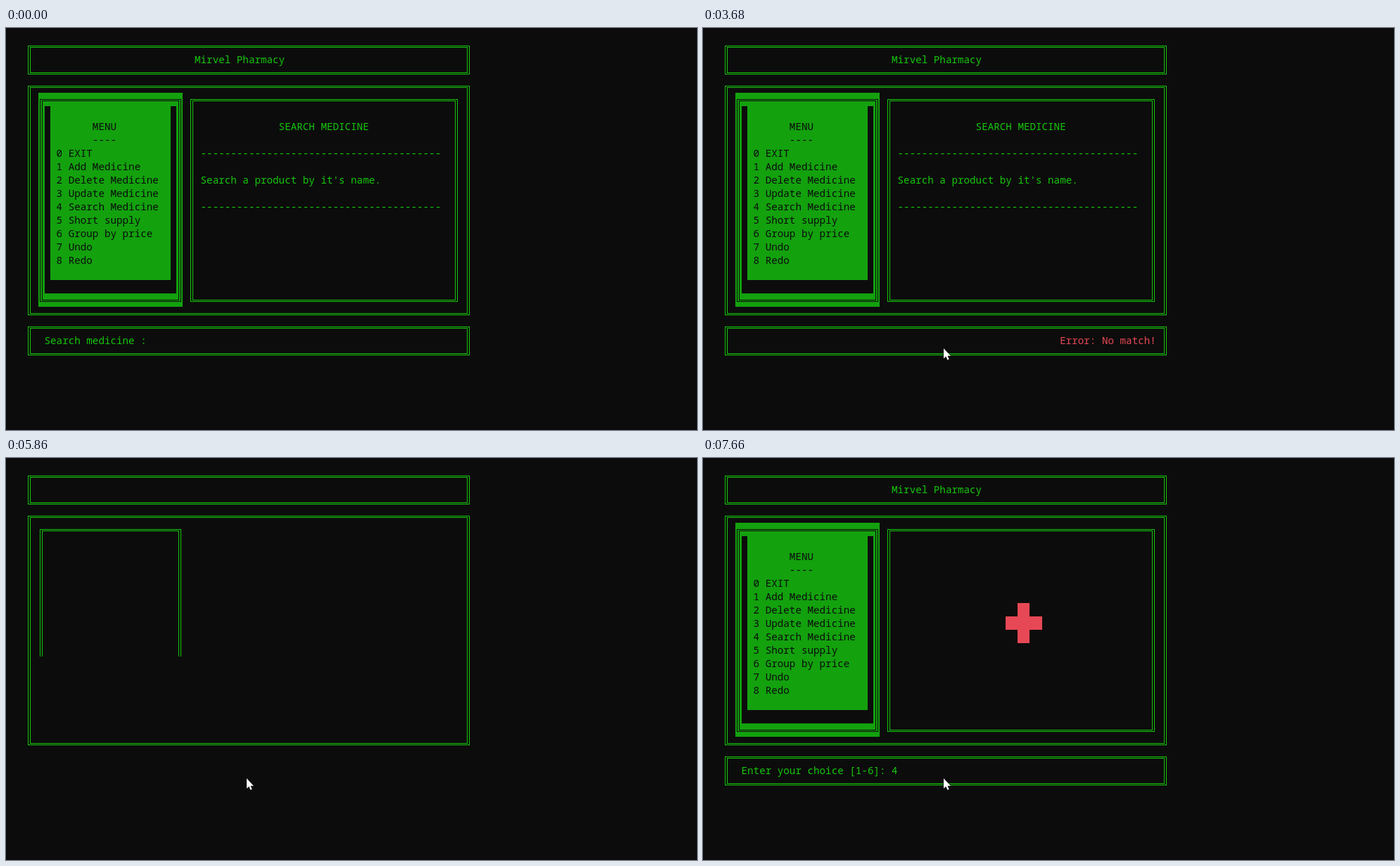
Recreate the animation shown at these times as an HTML page with a canvas. Size 982 by 571 pixels, loop 8000 ms.

```html
<!DOCTYPE html>
<html lang="en">
<head>
<meta charset="utf-8">
<title>Pharmacy console</title>
<style>
  html, body { margin: 0; width: 100%; height: 100%; overflow: hidden; background: #0c0c0c; }
  canvas { display: block; }
</style>
</head>
<body>
<canvas id="stage" width="982" height="571"></canvas>
<script>
const ctx = document.getElementById('stage').getContext('2d');
const LOOP = 8000;
const BG = '#0c0c0c', LIME = '#16c60c', GREEN = '#13a10e', RED = '#e74856', WHITE = '#f2f2f2';
const MENU = ['0 EXIT', '1 Add Medicine', '2 Delete Medicine', '3 Update Medicine',
  '4 Search Medicine', '5 Short supply', '6 Group by price', '7 Undo', '8 Redo'];
const RULE = '-'.repeat(40);

// Console grid: column and row to pixels
const colX = c => 3.3 + 8.54 * c;
const rowY = r => 19 * r - 3;

function cells(col, row, cols, rows, color) {
  ctx.fillStyle = color;
  const x = Math.round(colX(col));
  ctx.fillRect(x, rowY(row), Math.round(colX(col + cols)) - x, rows * 19);
}

function print(text, col, row, color = LIME) {
  ctx.fillStyle = color;
  [...text].forEach((ch, i) => ctx.fillText(ch, colX(col + i), rowY(row) + 15));
}

// Double-line frame through the middle of its border cells
function frame(c1, r1, c2, r2, color = LIME) {
  const x1 = Math.floor(colX(c1) + 2.9), x2 = Math.floor(colX(c2) + 2.9);
  const y1 = rowY(r1) + 9, y2 = rowY(r2) + 9;
  ctx.strokeStyle = color;
  ctx.lineWidth = 1;
  ctx.strokeRect(x1 + 0.5, y1 + 0.5, x2 - x1 + 3, y2 - y1 + 2);
  ctx.strokeRect(x1 + 3.5, y1 + 2.5, x2 - x1 - 3, y2 - y1 - 2);
}

function caret(col) {
  ctx.fillStyle = WHITE;
  ctx.fillRect(Math.round(colX(col)), 448, 9, 5);
}

function menu(count) {
  cells(5, 5, 24, 16, GREEN);
  cells(6, 6, 22, 14, BG);
  cells(7, 6, 20, 13, GREEN);
  frame(5, 5, 28, 20, BG);
  print('MENU', 14, 7, BG);
  print('----', 14, 8, BG);
  MENU.slice(0, count).forEach((item, i) => print(item, 8, 9 + i, BG));
}

function layout(count) {
  frame(3, 1, 76, 3);
  frame(3, 4, 76, 21);
  frame(3, 22, 76, 24);
  frame(30, 5, 74, 20);
  print('Mirvel Pharmacy', 31, 2);
  menu(count);
}

function searchScreen(t) {
  layout(9);
  print('SEARCH MEDICINE', 45, 7);
  print(RULE, 32, 9);
  print("Search a product by it's name.", 32, 11);
  print(RULE, 32, 13);
  if (t < 3150) print('Search medicine :', 6, 23);
  if (t >= 1200 && t < 1680) caret(24);
  if (t >= 1680 && t < 3150) print('4', 24, 23);
  if (t >= 1680 && t < 1830) caret(25);
  if (t >= 3150 && t < 3620) caret(76);
  if ((t >= 2610 && t < 3150) || (t >= 3680 && t < 5640)) print('Error: No match!', 59, 23, RED);
  if (t >= 5700) cells(0, 0, 80, 12, BG);
}

function partialScreen() {
  frame(3, 1, 76, 3);
  frame(3, 4, 76, 21);
  frame(5, 5, 28, 20);
  cells(5, 15, 24, 6, BG);
}

function menuScreen(t) {
  layout(t < 6080 ? 2 : 9);
  if (t < 6130) return;
  cells(52, 11, 2, 3, RED);
  cells(50, 12, 6, 1, RED);
  print('Enter your choice [1-6]:', 6, 23);
  if (t >= 7120 && t < 7580) caret(31);
  if (t >= 7580) print('4', 31, 23);
  if (t >= 7580 && t < 7660) caret(32);
}

const mix = (a, b, p) => a + (b - a) * p;

function pointer(t) {
  if (t < 210) return;
  let x, y;
  if (t < 1200) {
    const p = Math.min(6, Math.floor((t - 210) / 76.6)) / 6;
    const e = p * p * (3 - 2 * p);
    x = mix(649, 408, e);
    y = mix(492, 255, e);
  } else {
    const p = t < 1280 ? 0.35 : t < 1360 ? 0.8 : 1;
    x = mix(408, 342, p);
    y = mix(255, 455, p);
  }
  if (t >= 820 && t < 900) {
    ctx.fillStyle = 'rgba(255,255,0,.47)';
    ctx.beginPath();
    ctx.arc(409.5, 253.5, 14.5, 0, 7);
    ctx.fill();
  }
  ctx.save();
  ctx.translate(x, y);
  const arrow = new Path2D('M0 0V14.5L3.3 11.6L5.5 16.5L7.7 15.6L5.6 10.8H10Z');
  ctx.strokeStyle = '#000';
  ctx.stroke(arrow);
  ctx.fillStyle = '#fff';
  ctx.fill(arrow);
  ctx.restore();
}

function draw(now) {
  const t = now % LOOP;
  ctx.fillStyle = BG;
  ctx.fillRect(0, 0, 982, 571);
  ctx.font = '14.23px "Noto Sans Mono", "DejaVu Sans Mono", monospace';
  if (t < 5780) searchScreen(t);
  else if (t >= 5950) menuScreen(t);
  else if (t >= 5860) partialScreen();
  pointer(t);
  requestAnimationFrame(draw);
}
draw(0);
</script>
</body>
</html>
```
